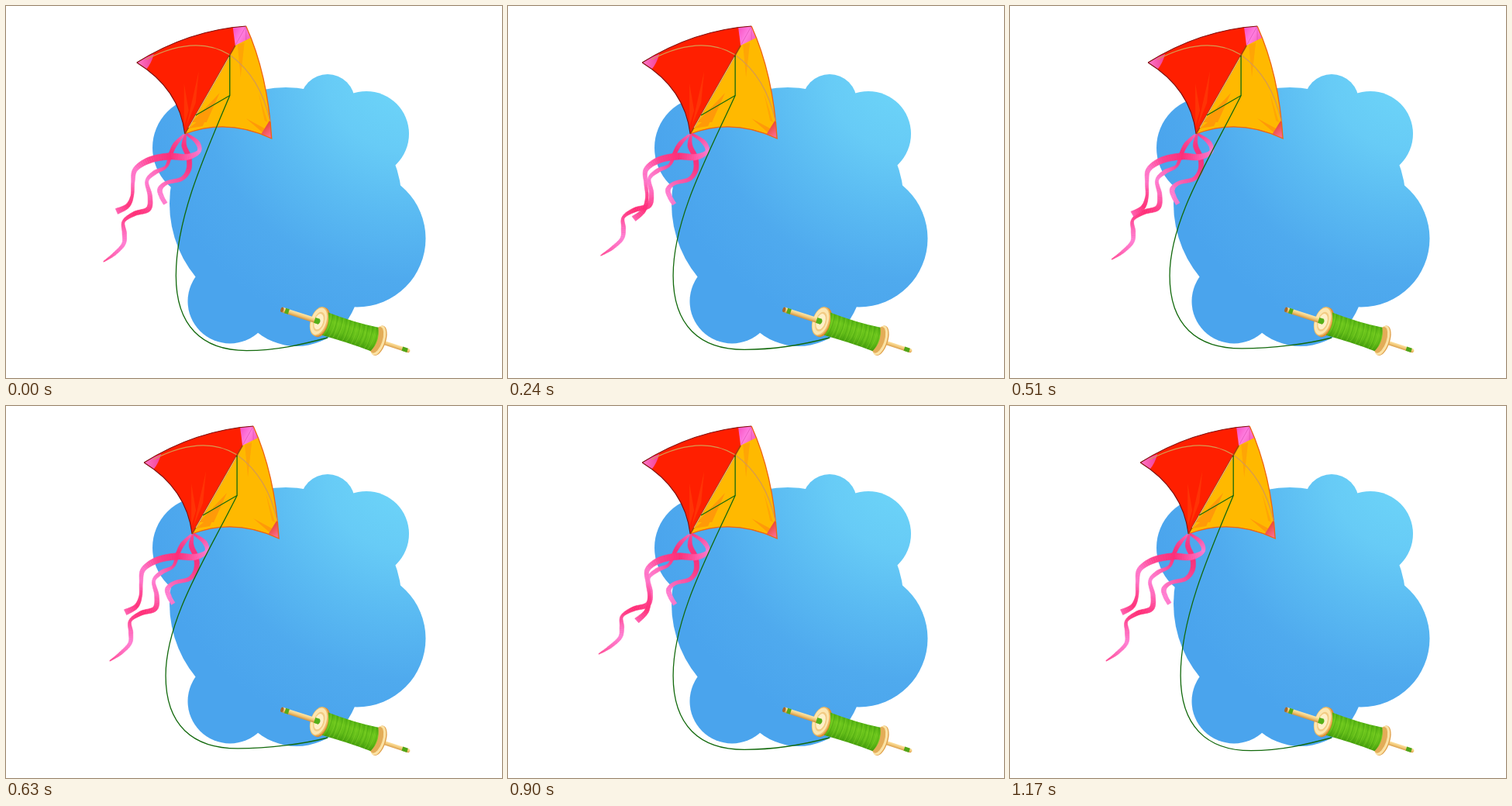
Write an HTML page with a canvas that moves like this. It is 640 by 480 pixels and loops after 1200 ms.

```html
<!DOCTYPE html>
<html lang="en">
<head>
<meta charset="utf-8">
<title>Kite</title>
<style>
html, body { margin: 0; width: 100%; height: 100%; overflow: hidden; background: #fff; }
canvas { display: block; width: 640px; height: 480px; }
</style>
</head>
<body>
<canvas id="stage" width="640" height="480"></canvas>
<script>
const c = document.getElementById('stage').getContext('2d');
const LOOP = 1200, STEP = 30;
const GREEN = '#12690c';

const fill = (d, color) => { c.fillStyle = color; c.fill(new Path2D(d)); };
const line = (d, color, w) => { c.strokeStyle = color; c.lineWidth = w; c.stroke(new Path2D(d)); };
const oval = (x, y, rx, ry, color) => {
  c.fillStyle = color;
  c.beginPath();
  c.ellipse(x, y, rx, ry, 0, 0, Math.PI * 2);
  c.fill();
};
const grad = (x0, y0, x1, y1, ...colors) => {
  const g = c.createLinearGradient(x0, y0, x1, y1);
  colors.forEach((k, i) => g.addColorStop(i / (colors.length - 1), k));
  return g;
};
const triangle = p => 1 - Math.abs(2 * (p - Math.floor(p)) - 1);

const sky = c.createRadialGradient(515, 85, 20, 515, 85, 350);
['#6cd4f8', '#67cbf6', '#5abaf2', '#4faaee', '#4aa4ed'].forEach((k, i) => sky.addColorStop(i / 4, k));

function cloud() {
  const puff = (x, y, r) => oval(x, y, r, r, sky);
  puff(361, 255, 150);
  puff(415, 123, 35);
  puff(465, 165, 55);
  puff(453, 300, 88.5);
  puff(289, 381, 54.5);
  puff(375, 358.5, 80.5);
  puff(255, 183, 66);
}

function kite() {
  const body = 'M169,73Q236,31 310,26Q338,88 343,171Q286,144 231,165Q224,107 169,73Z';
  fill(body, '#ff1f00');
  c.save();
  c.clip(new Path2D(body));
  fill('M311,24L231,165L290,185L360,175L345,24Z', '#ffb900');
  // fabric folds
  fill('M230,155L230,100L236,135ZM233,155L249,84L245,125ZM236,152L268,91Z', '#ff3305');
  fill('M236,158L262,137L254,155ZM240,150L276,112L259,150ZM331,163L310,145L334,158Z', '#ff9a08');
  fill('M299,50L303,92L308,47ZM338,150L326,112L334,148Z', '#ffa505');
  // corner patches
  fill('M292,20L296,51L320,39L312,20Z', grad(294, 30, 316, 42, '#f957c8', '#ff7fe0', '#f65db8'));
  fill('M165,73L191,62Q188,74 181,82Z', grad(169, 73, 189, 73, '#ff77c8', '#f2459b'));
  fill('M342,145L329,166L345,174Z', grad(332, 154, 345, 168, '#e8452f', '#ff739c'));
  line('M310,26L296,51M310,27V44M342,170V148', '#d84bab', .6);
  c.restore();
  line('M169,73Q236,31 310,26M169,73Q224,107 231,165', '#7c0d08', 1.1);
  line('M310,26Q338,88 343,171Q286,144 231,165', '#ee6510', 1.3);
  line('M181,69Q245,36 289,63Q329,92 341,149', '#d79a50', 1.2);
  line('M296,51L231,165', '#a63c0c', 1.6);
  line('M288,66L236,157', '#f3d39a', .9);
}

// Nodes are "x,y,half width"; the bend grows with the depth below the knot.
const ribbon = (nodes, bend, peak, rate) => ({
  nodes: nodes.split(' ').map(n => n.split(',').map(Number)), bend, peak, rate
});
const ribbons = [
  ribbon('230,166,1 219,178,2.7 213,190,2.4 207,207,1.6 192,215,2.7 182,226,2 186,245,2.8 ' +
    '184,262,3.2 166,268,2.8 152,278,1.7 153,293,2.8 152,307,2.3 140,320,2 126,330,.3',
    y => [-.08 * y, -.06 * y], 5, 1.05),
  ribbon('232,166,1 230,180,3 236,195,3.2 236,211,3 227,223,2.4 208,228,2.2 199,236,3 201,246,2.8 206,255,2.6',
    y => [.06 * y, .01 * y], 7, .63),
  ribbon('233,165,1 247,176,2.8 249,188,2.2 233,195,3.8 210,194,4.2 185,199,4 167,211,3 ' +
    '164,228,2.1 163,245,1.8 157,258,2.8 143,265,3.8',
    y => [.19 * y, 12 * (y / 100) ** 8], 2, 1.4)
];

function drawRibbon({ nodes, bend, peak, rate }, s) {
  const pts = nodes.map(([x, y, w], i) => {
    const [u, v] = bend(y - 165);
    return [x + u * s, y + v * s, w, .5 + .5 * Math.cos((i - peak) * rate)];
  });
  const at = i => pts[Math.max(0, Math.min(pts.length - 1, i))];
  const path = [];
  for (let i = 0; i < pts.length - 1; i++) {
    for (let n = 0; n < 8; n++) {
      const t = n / 8;
      path.push(at(i).map((b, j) => {
        const a = at(i - 1)[j], d = at(i + 1)[j], e = at(i + 2)[j];
        return j > 1 ? b + (d - b) * t
          : b + t / 2 * (d - a + t * (2 * a - 5 * b + 4 * d - e + t * (3 * (b - d) + e - a)));
      }));
    }
  }
  path.push(at(pts.length));
  const edges = path.map(([x, y, w], i) => {
    const p = path[Math.max(0, i - 1)], q = path[Math.min(path.length - 1, i + 1)];
    const dx = q[0] - p[0], dy = q[1] - p[1], m = w / (Math.hypot(dx, dy) || 1);
    return [x - dy * m, y + dx * m, x + dy * m, y - dx * m];
  });
  c.lineWidth = .5;
  for (let i = 1; i < edges.length; i++) {
    const a = edges[i - 1], b = edges[i], k = path[i][3];
    c.fillStyle = c.strokeStyle = `rgb(255,${45 + 80 * k | 0},${118 + 92 * k | 0})`;
    c.beginPath();
    c.moveTo(a[0], a[1]);
    c.lineTo(b[0], b[1]);
    c.lineTo(b[2], b[3]);
    c.lineTo(a[2], a[3]);
    c.closePath();
    c.fill();
    c.stroke();
  }
}

function thread(dx) {
  const x = 219 - 1.42 * dx, low = 444.5 - .28 * dx, mid = 310 - 1.2 * dx, top = 289 + dx;
  line(`M${top},64V115.5L${245 + dx},141`, GREEN, 1.3);
  line(`M${top},115.5C${255 + dx * .4},195 ${x},275 ${x},348C${x},412 ${mid - 58},${low} ${mid},${low}` +
    `C${mid + 40},${low} 385,436 415,428`, GREEN, 1.3);
}

function spool() {
  c.save();
  c.translate(440, 419);
  c.rotate(.314);
  const wood = grad(0, -3.5, 0, 3.5, '#ffe9ae', '#f3c979', '#cf8f3c');
  // right end
  fill('M44,-2.6H84Q87,0 84,2.6H44Z', wood);
  fill('M75,-2.8H82V2.8H75Z', '#4fa516');
  oval(43, -.5, 9, 20, '#e0a04a');
  oval(42, -.5, 8.6, 19.8, '#fbe2a4');
  oval(40, -.5, 7.5, 17.5, '#e3ac58');
  // left rim
  oval(-35.5, 0, 11, 19.8, '#df8d32');
  // wound thread
  const roll = 'M-31,-15Q5,-13 37,-16.5Q45,0 37,15.5Q5,14 -29,15.5Q-22,0 -31,-15Z';
  fill(roll, grad(0, -16, 0, 16, '#4fae10', '#6cc61c', '#62bc18', '#449c0c'));
  c.save();
  c.clip(new Path2D(roll));
  for (let i = 0; i < 24; i++) {
    const x = -30 + i * 3, bend = 5 + 2 * Math.sin(i * 2.4);
    line(`M${x},-17Q${x + bend},0 ${x + Math.sin(i * 5)},17`, i % 2 ? '#86d42c99' : '#3e980e88', .7);
  }
  c.restore();
  // left face and handle
  oval(-38, -.3, 11, 19.5, '#eebb67');
  oval(-38.6, -.3, 9.8, 18, '#fce6b0');
  oval(-38, 0, 7, 13, '#f2cb83');
  oval(-38.3, 0, 5.6, 10.5, '#fff0c8');
  fill('M-88,-3.3H-38V3.3H-88Z', wood);
  oval(-88, 0, 2, 3.3, '#a7682a');
  fill('M-84,-3.4H-79V3.4H-84Z', '#55aa18');
  fill('M-44,-3.6H-38Q-35,0 -38,3.6H-44Z', '#55b018');
  c.restore();
}

function draw(now) {
  const t = Math.floor(now % LOOP / STEP) * STEP;
  const dx = 11 * triangle((t + 30) / LOOP) - .8;
  c.fillStyle = '#fff';
  c.fillRect(0, 0, 640, 480);
  cloud();
  c.save();
  c.translate(dx, 0);
  kite();
  ribbons.forEach(r => drawRibbon(r, triangle(t / 600)));
  c.restore();
  thread(dx);
  spool();
}

let start;
function tick(now) {
  start ??= now;
  draw(now - start);
  requestAnimationFrame(tick);
}
draw(0);
requestAnimationFrame(tick);
</script>
</body>
</html>
```
